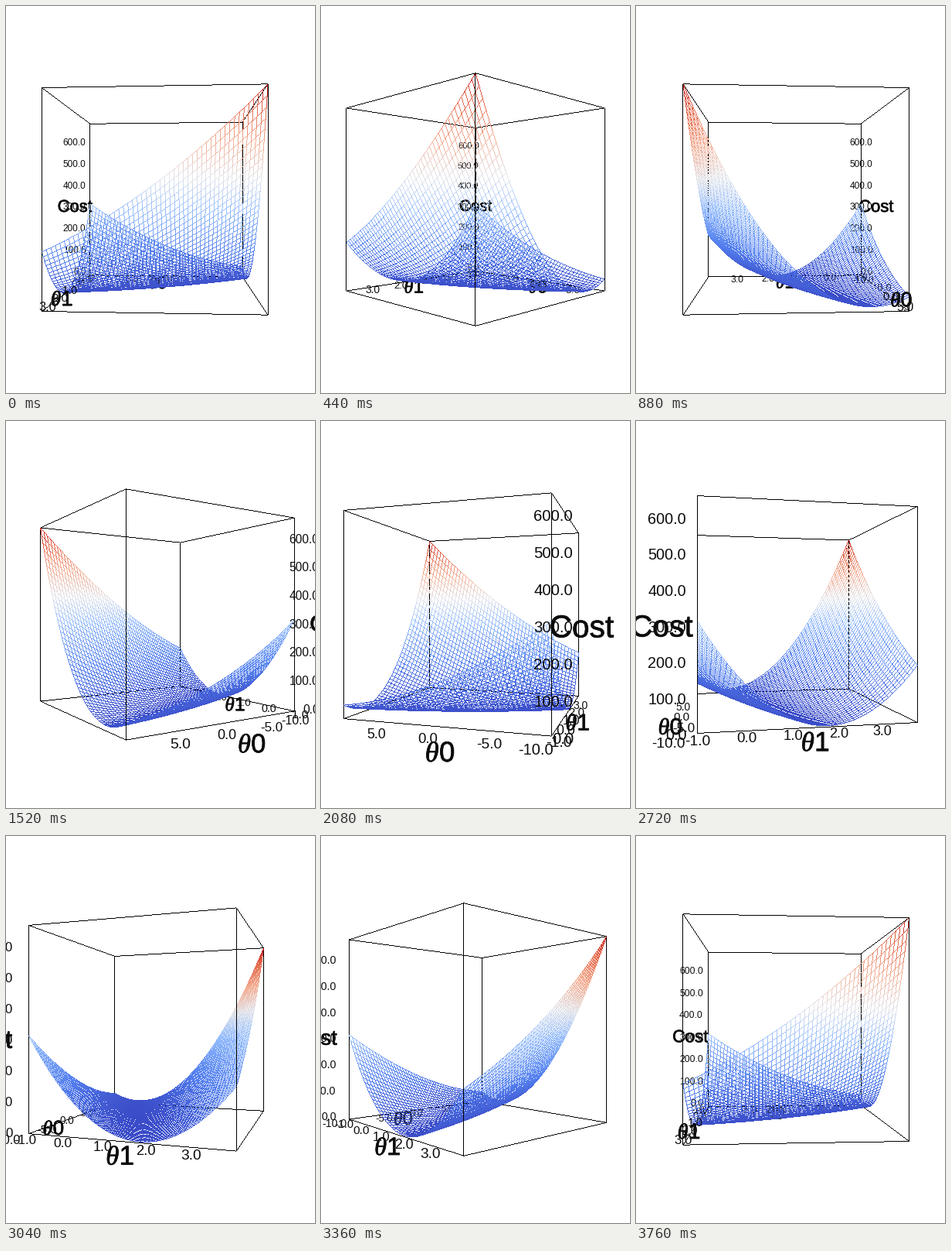
Recreate the animation shown at these times as a matplotlib script. Size 400 by 500 pixels, loop 3800 ms.

```python
import itertools

import matplotlib.pyplot as plt
import numpy as np
from matplotlib.animation import FuncAnimation
from matplotlib.colors import LinearSegmentedColormap
from matplotlib.patheffects import withStroke

W, H, DPI = 400, 500, 100
FRAMES, INTERVAL = 95, 40
FOCAL = H / 2 / np.tan(np.radians(22.5))
DISTANCE = 2.555
STEPS = 50
TICK_EM, TITLE_EM = 37.35, 71
PIXEL = 72 / DPI
INK = "#0c0c0c"

COLORS = LinearSegmentedColormap.from_list("cost", [
    (0.0, "#3b4cc8"), (0.22, "#5480ee"), (0.45, "#96bdfc"), (0.6, "#e2e4ea"),
    (0.75, "#f3b096"), (0.9, "#e4694c"), (1.0, "#c41a1a")])


def cost(t0, t1):
    """Least-squares cost of a straight-line fit."""
    d0, d1 = t0 + 3.63, t1 - 1.166
    return 4.477 + 0.5 * ((d0 + 8.16 * d1) ** 2 + 14.8 * d1 ** 2)


def project(points, turn):
    """Screen x, y and depth of points in the unit box, camera at mid height."""
    u, v, z = np.moveaxis(np.asarray(points, float), -1, 0)
    s, c = np.sin(turn), np.cos(turn)
    depth = DISTANCE - (u * c + v * s)
    x = W / 2 + FOCAL * (u * s - v * c) / depth
    y = H / 2 - FOCAL * (z - 0.5) / depth
    return x, y, depth


# Surface mesh
t0 = -10 + 20 / STEPS * np.arange(STEPS)
t1 = -1 + 5 / STEPS * np.arange(STEPS)
grid0, grid1 = np.meshgrid(t0, t1, indexing="ij")
values = cost(grid0, grid1)
low, span = values.min(), np.ptp(values)


def on_u(t):
    return (t - t0[0]) / np.ptp(t0) - 0.5


def on_v(t):
    return (t - t1[0]) / np.ptp(t1) - 0.5


def on_z(c):
    return (c - low) / span


nodes = np.stack([on_u(grid0), on_v(grid1), on_z(values)], axis=-1)
mesh = np.concatenate([
    np.stack([nodes[:-1], nodes[1:]], axis=2).reshape(-1, 2, 3),
    np.stack([nodes[:, :-1], nodes[:, 1:]], axis=2).reshape(-1, 2, 3)])
mesh_colors = COLORS(mesh[:, :, 2].mean(axis=1))

# Box edges join corners that differ in one coordinate; cut into short pieces
corners = itertools.product((-0.5, 0.5), (-0.5, 0.5), (0, 1))
edges = np.array([(a, b) for a, b in itertools.combinations(corners, 2)
                  if sum(p != q for p, q in zip(a, b)) == 1])
cuts = np.linspace(0, 1, 21)[:, None]
chains = edges[:, :1] * (1 - cuts) + edges[:, 1:] * cuts
box = np.stack([chains[:, :-1], chains[:, 1:]], axis=2).reshape(-1, 2, 3)

segments = np.concatenate([box, mesh])
colors = np.concatenate([np.tile([0, 0, 0, 1.0], (len(box), 1)), mesh_colors])
colors = np.round(colors * 255).astype(np.uint8)


def rasterize(x, y, depth):
    """Hard one-pixel lines, the nearest on top, on a clear canvas."""
    steep = np.abs(y[:, 1] - y[:, 0]) > np.abs(x[:, 1] - x[:, 0])
    major = np.where(steep[:, None], y, x)
    minor = np.where(steep[:, None], x, y)
    flip = (major[:, 0] > major[:, 1])[:, None]
    major, minor, depth = (np.where(flip, a[:, ::-1], a)
                           for a in (major, minor, depth))

    start = np.ceil(major[:, :1] - 0.5)
    reach = np.arange(int(np.ptp(major, axis=1).max()) + 2)
    m = start + reach
    length = np.maximum(major[:, 1:] - major[:, :1], 1e-9)
    part = (m + 0.5 - major[:, :1]) / length
    n = np.floor(minor[:, :1] + part * (minor[:, 1:] - minor[:, :1]))
    far = depth[:, :1] + part * (depth[:, 1:] - depth[:, :1])

    col = np.where(steep[:, None], n, m)
    row = np.where(steep[:, None], m, n)
    inside = ((part < 1) & (col >= 0) & (col < W) & (row >= 0) & (row < H))
    owner = np.nonzero(inside)[0]
    order = np.argsort(-far[inside], kind="stable")

    canvas = np.zeros((H, W, 4), np.uint8)
    rows = row[inside].astype(int)[order]
    cols = col[inside].astype(int)[order]
    canvas[rows, cols] = colors[owner[order]]
    return canvas


fig = plt.figure(figsize=(W / DPI, H / DPI), dpi=DPI, facecolor="white")
ax = fig.add_axes([0, 0, 1, 1])
picture = ax.imshow(np.zeros((H, W, 4), np.uint8), extent=(0, W, H, 0),
                    interpolation="nearest", aspect="auto", zorder=3)
ax.set_xlim(0, W)
ax.set_ylim(H, 0)
ax.axis("off")


class Label:
    """Text facing the camera; dx is in ems, dy in pixels at unit depth."""

    def __init__(self, text, point, em, dx=0.0, dy=0.0, **font):
        self.point, self.em, self.dx, self.dy = point, em, dx, dy
        font.setdefault("family", "Liberation Sans")
        self.text = ax.text(0, 0, text, ha="center", va="baseline",
                            color=INK, clip_on=True, **font)

    def place(self, turn):
        x, y, depth = project(self.point, turn)
        em = self.em / depth
        self.text.set_position((x + self.dx * em,
                                y + self.dy / depth + 0.358 * em))
        self.text.set_fontsize(em * PIXEL)
        self.text.set_zorder(2 if depth > 2.7 else 5)


NUDGE = {3: -0.22, 4: 0.12, 5: -0.83}
GAP = 0.07
HEAVY = [withStroke(linewidth=0.5, foreground=INK)]
labels = []


def add_tick(value, point, dy, nudge=True):
    text = f"{value:.1f}"
    dx = NUDGE[len(text)] if nudge else 0
    labels.append(Label(text, point, TICK_EM, dx, dy))


def add_title(text, point, dy, dx=0.0, **font):
    labels.append(Label(text, point, TITLE_EM, dx, dy,
                        path_effects=HEAVY, **font))


def add_theta(digit, point, dy):
    add_title("θ", point, dy, -0.28, family="Liberation Serif", style="italic")
    add_title(digit, point, dy, 0.25)


for t in range(-10, 6, 5):
    add_tick(t, (on_u(t), -0.5 - GAP, 0), 20)
for t in range(-1, 4):
    add_tick(t, (-0.53, on_v(t), 0), 12, nudge=False)
for c in range(0, 601, 100):
    add_tick(c, (-0.5 - GAP, -0.5 - GAP, on_z(c)), -13)

add_theta("0", (-0.06, -0.636, 0), 40)
add_theta("1", (-0.55, 0, 0), 28)
add_title("Cost", (-0.636, -0.636, 0.5), 26)


def update(frame):
    turn = np.radians(86.25 - 3.75 * frame)
    picture.set_data(rasterize(*project(segments, turn)))
    for label in labels:
        label.place(turn)
    return []


anim = FuncAnimation(fig, update, frames=FRAMES, interval=INTERVAL,
                     init_func=lambda: update(0), repeat=True,
                     repeat_delay=0, cache_frame_data=False)
plt.show()
```
